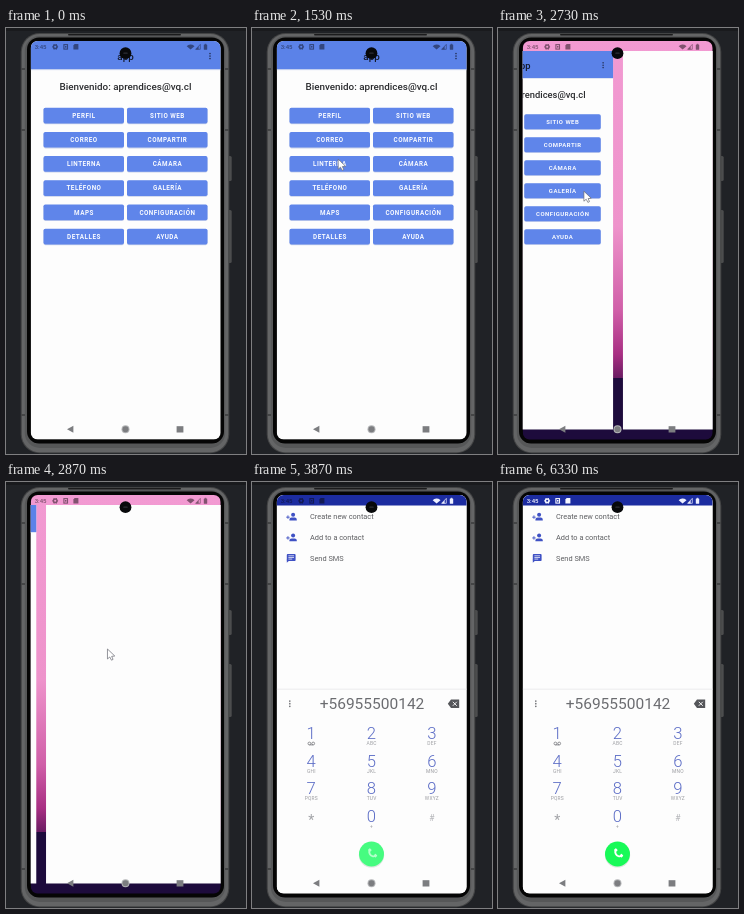
Recreate the animation shown at these times as an HTML page with a canvas. Size 240 by 426 pixels, loop 7.27 s.

```html
<!DOCTYPE html>
<html lang="es">
<head>
<meta charset="utf-8">
<title>Menú y marcador</title>
<style>
html, body { margin: 0; width: 100%; height: 100%; overflow: hidden; background: #202226; }
canvas { display: block; width: 240px; height: 426px; filter: blur(0.4px); }
</style>
</head>
<body>
<canvas id="stage"></canvas>
<script>
const LOOP = 7270, STEP = 1000 / 15;
const SX = 24.7, SY = 13, SW = 190, SH = 398.6, CX = 119.5, CY = 212.5;
const canvas = document.getElementById('stage');
const g = canvas.getContext('2d');
const dpr = window.devicePixelRatio || 1;
canvas.width = 240 * dpr;
canvas.height = 426 * dpr;

const clamp = v => Math.max(0, Math.min(1, v));
const ramp = (t, a, b) => clamp((t - a) / (b - a));
const smooth = u => u * u * (3 - 2 * u);
const mix = (a, b, u) => `rgb(${a.map((v, i) => Math.round(v + (b[i] - v) * u))})`;

function rect(x, y, w, h, color) {
  g.fillStyle = color;
  g.fillRect(x, y, w, h);
}
function round(x, y, w, h, r, color) {
  g.fillStyle = color;
  g.beginPath();
  g.roundRect(x, y, w, h, r);
  g.fill();
}
function dot(x, y, r, color) {
  g.fillStyle = color;
  g.beginPath();
  g.arc(x, y, r, 0, 7);
  g.fill();
}
function poly(points, color) {
  g.fillStyle = color;
  g.beginPath();
  points.forEach(([x, y]) => g.lineTo(x, y));
  g.closePath();
  g.fill();
}
function text(s, x, y, size, color, { weight = 400, align = 'center', gap = 0 } = {}) {
  g.font = `${weight} ${size}px Roboto, sans-serif`;
  g.letterSpacing = gap + 'px';
  g.textAlign = align;
  g.fillStyle = color;
  g.fillText(s, x + (align === 'center' ? gap / 2 : 0), y);
}
function dots(x, y, gap, color) {
  for (let i = -1; i < 2; i++) dot(x, y + i * gap, 0.85, color);
}

function phone() {
  rect(0, 0, 240, 426, '#202226');
  rect(0, 0, 240, 3, '#191a1d');
  round(221, 128, 4.7, 25, 1.5, '#4c4d4e');
  round(221, 182, 4.7, 53, 1.5, '#4c4d4e');
  round(14.7, 5, 208.6, 420.3, 19, '#434445');
  round(15.8, 6, 206.4, 418.3, 18, '#646566');
  round(18.8, 8, 200.4, 412, 15, '#565758');
  round(21, 9.5, 197, 406, 12, '#050505');
  round(62, 6, 113, 1.6, 0.8, '#1b1b1c');
  for (const y of [40, 101, 386]) {
    rect(15, y, 4, 2, '#444546');
    rect(219, y, 4, 2, '#444546');
  }
}

const labels = [
  ['PERFIL', 'SITIO WEB'], ['CORREO', 'COMPARTIR'], ['LINTERNA', 'CÁMARA'],
  ['TELÉFONO', 'GALERÍA'], ['MAPS', 'CONFIGURACIÓN'], ['DETALLES', 'AYUDA']
];
function menu() {
  rect(SX, SY, SW, SH, '#fdfdfd');
  rect(SX, SY, SW, 28.5, '#5b82e8');
  rect(SX, SY + 28.5, SW, 0.7, '#d5dcee');
  text('app', CX, 31.5, 9.8, '#141a2c', { weight: 500 });
  dots(204, 28, 2.5, '#26345f');
  text('Bienvenido: aprendices@vq.cl', CX, 62.2, 9.85, '#2c2d30', { weight: 500 });
  labels.forEach((row, r) => row.forEach((label, c) => {
    const x = c ? 121 : 37.5, y = 79.7 + r * 24.2;
    round(x, y + 0.5, 80.5, 16, 1.8, '#c9d2ea');
    round(x, y, 80.5, 15.7, 1.8, '#5f85ea');
    text(label, x + 40.2, y + 10.1, 6.3, '#f8faff', { weight: 700, gap: 0.5 });
  }));
}

function person(y) {
  const c = '#3f51c4';
  dot(41.1, y - 2, 2, c);
  round(37.4, y + 0.8, 7.4, 2.9, [2.2, 2.2, 0, 0], c);
  rect(35.5, y - 1.4, 0.9, 3.4, c);
  rect(34.2, y - 0.1, 3.5, 0.9, c);
}
function message(y) {
  const c = '#3f51c4';
  round(34.8, y - 4.3, 8.8, 7, 0.8, c);
  poly([[34.8, y + 1], [34.8, y + 4.4], [37, y + 2.4]], c);
  for (let i = 0; i < 3; i++) rect(36.4, y - 2.9 + i * 1.6, i === 2 ? 3.8 : 5.6, 0.7, '#fff');
}
function handset(x, y, color) {
  g.save();
  g.translate(x, y);
  g.rotate(Math.PI / 4);
  g.strokeStyle = color;
  g.lineWidth = 1.9;
  g.beginPath();
  g.arc(0, -3, 4.4, 0.3, Math.PI - 0.3);
  g.stroke();
  round(-5.4, -3, 2.9, 2.7, 0.6, color);
  round(2.5, -3, 2.9, 2.7, 0.6, color);
  g.restore();
}
function dialer(t) {
  const settle = ramp(t, 3870, 4800);
  rect(SX, SY, SW, SH, '#fdfdfd');
  ['Create new contact', 'Add to a contact', 'Send SMS'].forEach((s, i) => {
    const y = 34.8 + i * 20.8;
    i < 2 ? person(y) : message(y);
    text(s, 58, y + 2.5, 7.4, '#5c5d60', { align: 'left' });
  });
  rect(SX, 206.7, SW, 0.9, '#e9e9eb');
  dots(37.8, 221.7, 2.6, '#75767a');
  text('+56955500142', CX + 0.5, 227.2, 15.5, '#6b6c70');
  poly([[195.8, 221.8], [199, 217.5], [207.2, 217.5], [207.2, 226], [199, 226]], '#55565a');
  g.strokeStyle = '#fff';
  g.lineWidth = 0.9;
  g.beginPath();
  for (const d of [-1, 1]) {
    g.moveTo(200.8, 221.8 - d * 2);
    g.lineTo(204.8, 221.8 + d * 2);
  }
  g.stroke();

  const subs = ['', 'ABC', 'DEF', 'GHI', 'JKL', 'MNO', 'PQRS', 'TUV', 'WXYZ', '', '+', ''];
  [...'123456789*0#'].forEach((key, i) => {
    const x = 59.2 + (i % 3) * 60.3, y = 256.8 + Math.floor(i / 3) * 27.7;
    if (key === '*') text(key, x, y + 3.5, 14, '#a3a4a8');
    else if (key === '#') text(key, x, y - 0.5, 8.5, '#b0b1b5');
    else text(key, x, y, 16.7, '#5c6dc6', { weight: 300 });
    text(subs[i], x, y + 6.2, 4.9, '#9b9ca1', { gap: 0.2 });
  });
  g.strokeStyle = '#77787d';
  g.lineWidth = 0.8;
  g.beginPath();
  g.arc(57.4, 261.5, 1.4, 0, 7);
  g.moveTo(62.6, 261.5);
  g.arc(61.2, 261.5, 1.4, 0, 7);
  g.moveTo(57.4, 262.9);
  g.lineTo(61.2, 262.9);
  g.stroke();

  dot(CX, 372.9, 12.7, '#dde6e0');
  dot(CX, 372, 12.5, mix([70, 252, 128], [24, 250, 88], settle));
  handset(CX, 372, mix([178, 255, 202], [255, 255, 255], settle));
  rect(SX, SY, SW, 10.5, '#1c2ca0');
}

// clock and notifications
function leftIcons(c) {
  text('3:45', 28.7, 21, 6, c, { align: 'left', weight: 500 });
  g.strokeStyle = c;
  g.lineWidth = 1.5;
  g.beginPath();
  g.arc(49.2, 18.8, 1.8, 0, 7);
  g.stroke();
  for (let i = 0; i < 6; i++) {
    const a = i * Math.PI / 3;
    dot(49.2 + 2.4 * Math.cos(a), 18.8 + 2.4 * Math.sin(a), 0.6, c);
  }
  g.lineWidth = 1.1;
  g.strokeRect(57.9, 16.6, 3.6, 4.5);
  rect(59, 18, 1.5, 1.6, c);
  poly([[68.6, 16], [72.4, 16], [72.4, 21.6], [67.4, 21.6], [67.4, 17.4]], c);
}
// wifi, signal, battery
function rightIcons(c) {
  g.fillStyle = g.strokeStyle = c;
  g.beginPath();
  g.moveTo(184.6, 21.6);
  g.arc(184.6, 21.6, 5.2, -Math.PI * 0.77, -Math.PI * 0.23);
  g.fill();
  g.lineWidth = 0.7;
  g.beginPath();
  g.moveTo(189.6, 21.3);
  g.lineTo(194.3, 21.3);
  g.lineTo(194.3, 16.4);
  g.closePath();
  g.stroke();
  poly([[189.6, 21.4], [192.6, 21.4], [192.6, 18.2]], c);
  round(197.8, 16.6, 3.4, 5.2, 0.5, c);
  rect(198.8, 15.8, 1.4, 1, c);
}
function nav() {
  const c = '#7c7d80';
  poly([[61, 401.2], [67.4, 397.8], [67.4, 404.7]], c);
  dot(CX, 401.3, 4, '#b4b5b7');
  dot(CX, 401.3, 3, c);
  rect(170.6, 398.2, 6.8, 6.3, c);
}
function camera() {
  dot(CX, 25.2, 5.9, '#08090b');
  round(CX - 2.2, 24.6, 4.4, 1.2, 0.6, '#2c2e35');
}

function wallpaper() {
  const sky = g.createLinearGradient(0, SY, 0, 350);
  sky.addColorStop(0, '#f29ad2');
  sky.addColorStop(0.55, '#ee93cb');
  sky.addColorStop(0.8, '#d05fa8');
  sky.addColorStop(0.93, '#a82f83');
  sky.addColorStop(1, '#6a1c62');
  rect(SX, SY, SW, 337, sky);
  rect(SX, 350, SW, 63, '#1d0b3c');
}
function win(dx, scale, draw) {
  g.save();
  g.translate(CX + dx, CY);
  g.scale(scale, scale);
  g.translate(-CX, -CY);
  g.beginPath();
  g.rect(SX, SY, SW, SH);
  g.clip();
  draw();
  g.restore();
}
const blank = () => rect(SX, SY, SW, SH, '#fdfdfd');

function screen(t) {
  let left = '#33467f', right = left;
  if (t < 2610) menu();
  else if (t < 3060) {
    wallpaper();
    const shift = SW * Math.pow(1 - ramp(t, 2667, 2990), 3);
    const scale = 1 - 0.05 * (smooth(ramp(t, 2600, 2733)) - smooth(ramp(t, 2880, 3040)));
    win(shift - SW, scale, menu);
    win(shift, scale, blank);
    left = right = '#80526f';
  } else {
    blank();
    left = right = '#6f7074';
    if (t > 3460) {
      g.globalAlpha = ramp(t, 3400, 3660);
      dialer(t);
      g.globalAlpha = 1;
      left = mix([18, 26, 84], [246, 247, 255], ramp(t, 3870, 4800));
      right = '#eef0ff';
    }
  }
  leftIcons(left);
  rightIcons(right);
  nav();
  camera();
}

const path = [
  [800, 226, 313], [1200, 140, 200], [1530, 86.3, 131], [1800, 78, 146], [2130, 71.5, 159.7],
  [2610, 71.5, 159.7], [2867, 101.5, 167], [3000, 160, 178], [3140, 230, 190]
];
function cursor(t) {
  if (t < 799 || t > 3150) return;
  let i = 0;
  while (i < path.length - 2 && t > path[i + 1][0]) i++;
  const [a, b] = [path[i], path[i + 1]];
  const u = ramp(t, a[0], b[0]);
  g.save();
  g.translate(a[1] + (b[1] - a[1]) * u, a[2] + (b[2] - a[2]) * u);
  poly([[0, 0], [0, 10], [2.3, 8], [4, 11.2], [5.6, 10.4], [4.2, 7.4], [7.3, 7]], '#fff');
  g.strokeStyle = '#666870';
  g.lineWidth = 0.7;
  g.stroke();
  g.restore();
}

function render(now) {
  const t = Math.floor((now % LOOP + 4) / STEP) * STEP;
  g.setTransform(dpr, 0, 0, dpr, 0, 0);
  phone();
  g.save();
  g.beginPath();
  g.roundRect(SX, SY, SW, SH, 7);
  g.clip();
  screen(t);
  g.restore();
  cursor(t);
}

const start = performance.now();
function frame() {
  render(performance.now() - start);
  requestAnimationFrame(frame);
}
frame();
</script>
</body>
</html>
```
